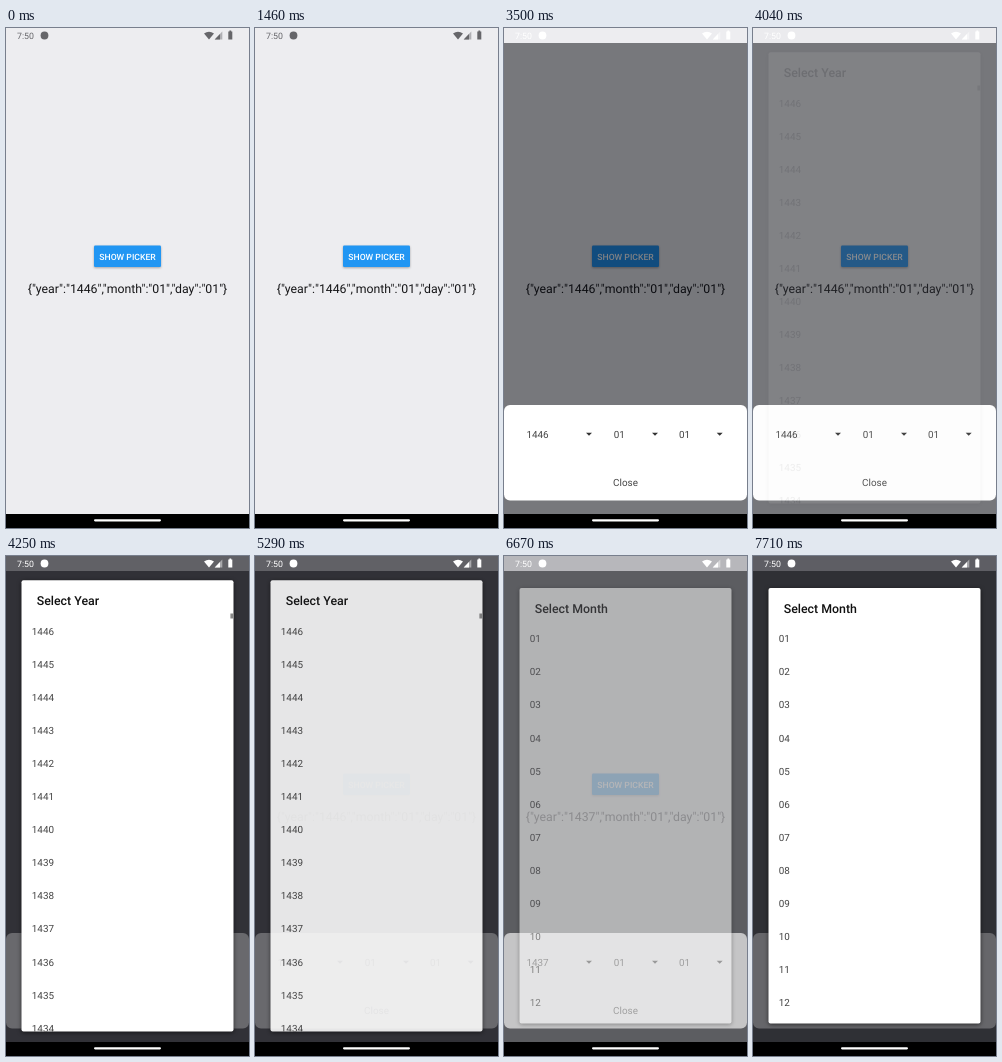
These frames come from a looping animation (243 px wide and 500 px high, 8000 ms). An HTML page:

```html
<!DOCTYPE html>
<html lang="en">
<head>
<meta charset="utf-8">
<title>Date picker</title>
<style>
  html, body { margin: 0; width: 100%; height: 100%; overflow: hidden; background: #ededf0; }
  svg { display: block; width: 100%; height: 100%; }
  text { font: 9.9px Roboto, sans-serif; fill: #444; text-rendering: geometricPrecision; }
  .middle { text-anchor: middle; }
  .clock { font-size: 8.8px; fill: inherit; }
  .label { font-size: 8.65px; font-weight: 500; fill: #fff; }
  .json { font-size: 12.3px; fill: #161618; }
  .title { font-size: 12.37px; font-weight: 500; fill: #111; }
  .button { fill: #2196f3; filter: drop-shadow(0 1px 1px rgba(0, 0, 0, .3)); }
  .panel { fill: #fff; filter: drop-shadow(0 1px 2px rgba(0, 0, 0, .6)); }
</style>
</head>
<body>
<svg viewBox="0 0 243 500">
  <defs>
    <clipPath id="listClip"><rect x="15.5" y="24" width="212" height="451.5"/></clipPath>
  </defs>
  <rect width="243" height="500" fill="#ededf0"/>
  <rect class="button" x="88" y="217.5" width="67" height="21.5" rx="1.2"/>
  <text class="label middle" x="121.5" y="231.5">SHOW PICKER</text>
  <text class="json middle" id="json" x="121.5" y="264.7"></text>

  <g id="modal">
    <rect y="15" width="243" height="471" fill="rgb(3,4,10)" fill-opacity=".5"/>
    <rect y="377" width="243" height="95.5" rx="6" fill="#fff"/>
    <text id="year" x="22.4" y="409.7"></text>
    <text x="109.7" y="409.7">01</text>
    <text x="175" y="409.7">01</text>
    <path d="M82 404.8h6l-3 3zM148 404.8h6l-3 3zM212.7 404.8h6l-3 3z" fill="#333"/>
    <text class="middle" x="121.5" y="457.6">Close</text>
  </g>

  <rect id="dim" width="243" height="486" fill="#000008"/>
  <g id="yearDialog"></g>
  <g id="monthDialog"></g>

  <g id="status">
    <text class="clock" x="11" y="10.8">7:50</text>
    <circle cx="38.5" cy="7.5" r="3.9"/>
    <path d="M198 5.6Q203 1.8 208 5.6L203 11.6z"/>
    <path d="M216.3 3.6V11.4H208.7z" fill-opacity=".45"/>
    <path d="M214 6V11.4H208.7z"/>
    <path d="M222.3 3.4h1.1v-.9h1.8v.9h1.1v8.2h-4z"/>
  </g>
  <rect y="486" width="243" height="14"/>
  <rect x="88" y="491.2" width="67" height="2.2" rx="1.1" fill="#fff"/>
</svg>
<script>
const LOOP = 8000;
const $ = id => document.getElementById(id);
const progress = (t, start, duration) => Math.min(1, Math.max(0, (t - start) / duration));
const ease = p => (1 - Math.cos(Math.PI * p)) / 2;

function buildDialog(id, title, top, height, items) {
  const rows = items.map((item, i) =>
    `<text x="25.8" y="${top + 54.2 + i * 33.1}">${item}</text>`).join('');
  $(id).innerHTML =
    `<rect class="panel" x="15.5" y="${top}" width="212" height="${height}" rx="2"/>
     <text class="title" x="30.7" y="${top + 25}">${title}</text>
     <g clip-path="url(#listClip)">${rows}</g>`;
}

buildDialog('yearDialog', 'Select Year', 24.3, 451.2, Array.from({ length: 13 }, (_, i) => 1446 - i));
$('yearDialog').innerHTML += '<rect x="224.4" y="57.5" width="3" height="5" fill="#888"/>';
buildDialog('monthDialog', 'Select Month', 32, 435.5,
  Array.from({ length: 12 }, (_, i) => String(i + 1).padStart(2, '0')));

function render(t) {
  const year = t < 5440 ? '1446' : '1437';
  $('json').textContent = `{"year":"${year}","month":"01","day":"01"}`;
  $('year').textContent = year;

  const slide = ease(progress(t, 2180, 420));
  $('modal').setAttribute('transform', `translate(0 ${471 * (1 - slide)})`);
  $('status').setAttribute('fill', t < 2120 ? '#66666a' : '#fff');

  const shown = (inMs, outMs) =>
    progress(t, 4025, inMs) - progress(t, 5270, outMs);
  $('yearDialog').setAttribute('opacity', shown(200, 180));
  $('monthDialog').setAttribute('opacity', progress(t, 6565, 200));
  const dim = ease(shown(250, 220)) + ease(progress(t, 6565, 250));
  $('dim').setAttribute('opacity', 0.6 * dim);
}

function tick() {
  render(performance.now() % LOOP);
  requestAnimationFrame(tick);
}
tick();
</script>
</body>
</html>
```
